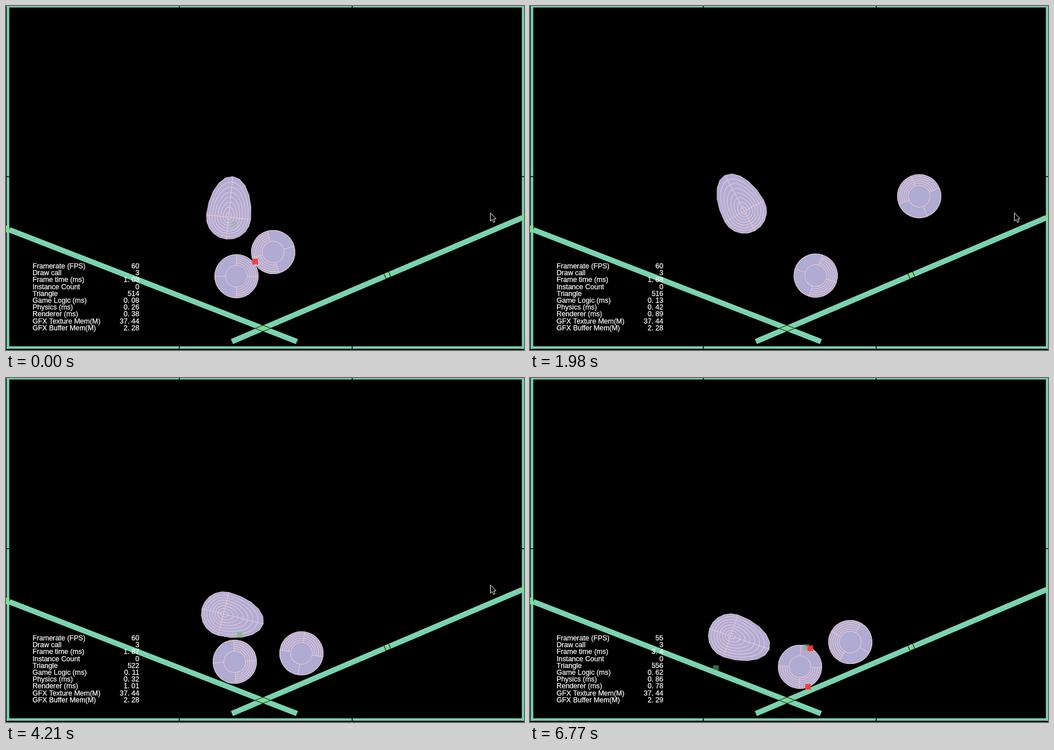
Animation of 917 by 611 pixels, one loop 6.87 s. Source, as an HTML page with a canvas:

```html
<!DOCTYPE html>
<html lang="en">
<head>
<meta charset="utf-8">
<title>Bouncing bodies</title>
<style>
  html, body { margin: 0; width: 100%; height: 100%; overflow: hidden; background: #000; }
  canvas { display: block; }
</style>
</head>
<body>
<canvas id="stage" width="917" height="611"></canvas>
<script>
const ctx = document.getElementById('stage').getContext('2d');
const LOOP = 6870, STEP = 149, GRAVITY = 320 / 1e6, FADE = 420;
const RAD = Math.PI / 180, TAU = 2 * Math.PI;
const MINT = '#76d0b2', EDGE = '#8adfb0', GREEN = '#7fdc8c', FILL = '#b1add6', LINE = '#ecccd0';

// Moments of the key poses
const TIMES = [50, 1390, 2570, 3620, 4210, 5690, 6770];

// The two ramps: start, end
const ramps = [[6, 397.5, 515, 596], [400, 596, 914, 376]];
const rampY = ([x1, y1, x2, y2], x) => y1 + (x - x1) * (y2 - y1) / (x2 - x1);
const rampAt = x => ramps[x < 455 ? 0 : 1];
const rampAngle = ([x1, y1, x2, y2]) => Math.atan2(y2 - y1, x2 - x1);

// Height of the centre of a body that rests on a ramp
const restY = x => rampY(rampAt(x), x) - 43.5 / Math.cos(rampAngle(rampAt(x)));

// poses: x, y, degrees at TIMES; hits: time and x of each bounce on a ramp
function body(draw, poses, hits) {
  const keys = poses.map(([x, y], i) => [TIMES[i], x, y])
    .concat(hits.map(([t, x]) => [t, x, restY(x)]))
    .sort((a, b) => a[0] - b[0]);
  const turns = poses.map((p, i) => [TIMES[i], p[2]]);
  return { draw, keys, turns, hits };
}

const bodies = [
  body(egg,
    [[394, 375, 6], [342, 387.5, -23], [417, 453, -34], [415, 401, 117], [385, 419, 104], [301, 418, 77], [355, 458, 109]],
    [[900, 336], [5280, 315], [6580, 342]]),
  body(disc,
    [[408, 480, 0], [512, 479, 4], [485, 498, 32], [467, 515, 37], [405, 504, -3], [424, 498, 11], [478, 513, 92]],
    [[250, 418], [1500, 519], [2300, 497], [2650, 487], [3610, 467], [5400, 401], [6760, 478]]),
  body(disc,
    [[473, 437, 165], [690, 395, 169], [688, 392, 327], [588, 384, 308], [523, 489, 279], [520, 455, 351], [567, 469, 210]],
    [[1190, 690], [2700, 687], [4240, 520], [5390, 552]])];

// Bumps between bodies, then bounces on the ramps: time, x, y
const contacts = [[50, 441, 454], [-230, 403, 388], [2570, 450, 477], [3450, 464, 461],
  [4060, 414, 456], [6600, 489, 478], [6740, 496, 480]];
for (const { hits } of bodies)
  for (const [t, x] of hits) {
    const a = rampAngle(rampAt(x));
    contacts.push([t, x - 36 * Math.sin(a), restY(x) + 36 * Math.cos(a)]);
  }

const labels = ['Framerate (FPS)', 'Draw call', 'Frame time (ms)', 'Instance Count', 'Triangle',
  'Game Logic (ms)', 'Physics (ms)', 'Renderer (ms)', 'GFX Texture Mem(M)', 'GFX Buffer Mem(M)'];
// Per key pose: fps, frame time, triangles, logic, physics, renderer
const readings = [
  [60, 1.03, 514, 0.08, 0.26, 0.38], [60, 1.88, 516, 0.13, 0.42, 0.89],
  [59, 2.56, 514, 0.09, 0.4, 1.58], [60, 1.55, 518, 0.2, 0.29, 0.68],
  [60, 1.87, 522, 0.11, 0.32, 1.01], [60, 1.92, 514, 0.09, 0.36, 0.73],
  [55, 3.4, 556, 0.62, 0.86, 0.78]];

const clamp = v => Math.max(0, Math.min(1, v));
const lerp = (a, b, u) => a + (b - a) * u;

// Index of the span that holds t
function spanAt(times, t) {
  let i = 0;
  while (i < times.length - 2 && times[i + 1] <= t) i++;
  return i;
}

// The picture is refreshed about every 149 ms, in even steps between key poses
function refreshTime(t) {
  const i = spanAt(TIMES, t), a = TIMES[i], span = TIMES[i + 1] - a;
  const n = Math.round(span / STEP);
  const k = Math.floor((t - a) / span * n + 0.04);
  return a + Math.max(0, Math.min(n, k)) * span / n;
}

// Free flight between keys, steady spin between poses
function place({ keys, turns }, t) {
  const k = spanAt(keys.map(r => r[0]), t), [t0, x0, y0] = keys[k], [t1, x1, y1] = keys[k + 1];
  const u = clamp((t - t0) / (t1 - t0));
  const j = spanAt(TIMES, t), [s0, d0] = turns[j], [s1, d1] = turns[j + 1];
  return [lerp(x0, x1, u),
    lerp(y0, y1, u) - GRAVITY / 2 * (t1 - t0) ** 2 * u * (1 - u),
    lerp(d0, d1, clamp((t - s0) / (s1 - s0))) * RAD];
}

function placed([x, y, angle], draw) {
  ctx.save();
  ctx.translate(x, y);
  ctx.rotate(angle);
  draw();
  ctx.restore();
}

function line(x1, y1, x2, y2, color, width = 1) {
  ctx.beginPath();
  ctx.moveTo(x1, y1);
  ctx.lineTo(x2, y2);
  ctx.strokeStyle = color;
  ctx.lineWidth = width;
  ctx.stroke();
}

function rect(x, y, w, h, color) {
  ctx.fillStyle = color;
  ctx.fillRect(x, y, w, h);
}

function polygon(points, fill, stroke, width = 1) {
  ctx.beginPath();
  for (const [x, y] of points) ctx.lineTo(x, y);
  ctx.closePath();
  ctx.fillStyle = fill;
  ctx.fill();
  ctx.strokeStyle = stroke;
  ctx.lineWidth = width;
  ctx.stroke();
}

function arc(r, from = 0, to = TAU) {
  ctx.beginPath();
  ctx.arc(0, 0, r, from, to);
  ctx.stroke();
}

function disc() {
  ctx.fillStyle = '#afabd3';
  ctx.strokeStyle = LINE;
  ctx.lineWidth = 1;
  arc(38.5);
  ctx.fill();
  ctx.stroke();
  arc(19.3);
  for (let r = 23.2; r < 38; r += 3.8) arc(r, -TAU / 4, TAU / 4);
  for (let a = 0; a < TAU - 0.1; a += TAU / 4) {
    const c = Math.cos(a), s = Math.sin(a);
    line(c * 19.3, s * 19.3, c * 38.5, s * 38.5, LINE);
  }
}

function egg() {
  const rim = Array.from({ length: 20 }, (_, k) => {
    const s = Math.sin(k * TAU / 20);
    return [39.3 * Math.cos(k * TAU / 20), s * (s < 0 ? 72.5 : 39.3)];
  });
  polygon(rim, FILL, LINE);
  for (let k = 1; k < 8; k++) {
    const r = 39 * k / 8;
    ctx.beginPath();
    ctx.ellipse(0, 0, r, 71 * k / 8, 0, Math.PI, TAU);
    ctx.ellipse(0, 0, r, r, 0, 0, Math.PI);
    ctx.stroke();
  }
  line(0, -71, 0, 38.5, LINE);
  line(-38.5, 0, 38.5, 0, LINE);
}

function plank(ramp) {
  const [x1, y1, x2, y2] = ramp, len = Math.hypot(x2 - x1, y2 - y1);
  placed([x1, y1, rampAngle(ramp)], () => {
    rect(0, -4.6, len, 9.2, MINT);
    for (const y of [-4.2, -1.3, 4.2]) line(0, y, len, y, EDGE, 0.8);
  });
}

function room() {
  rect(0, 0, 917, 611, '#000');
  rect(1, 0, 916, 2.6, MINT);
  rect(1, 604.4, 916, 4.4, MINT);
  rect(1.2, 0, 4.6, 609, MINT);
  rect(913.2, 0, 3.8, 609, MINT);
  for (const x of [306, 612]) {
    rect(x, 0, 1.5, 3, '#000');
    rect(x, 604, 1.5, 5, '#000');
  }
  rect(0, 302.5, 917, 1.5, '#000');

  ramps.forEach(plank);
  rect(0, 390, 6, 12, GREEN);
  rect(913, 370, 4, 10, GREEN);
  placed([675, 478, rampAngle(ramps[1])], () => {
    rect(-5, -5, 10, 10, '#000');
    rect(-4, -4.6, 8, 9.2, GREEN);
  });
  polygon([[441, 572.5], [455, 567], [469, 572.5], [455, 578]], GREEN, '#06150c');
}

function marks(t) {
  for (const [at, x, y] of contacts) {
    const age = t - at;
    if (age < 0 || age > FADE) continue;
    ctx.globalAlpha = age < 100 ? 0.95 : 1 - age / FADE;
    rect(x - 5, y - 5, 10, 10, age < 100 ? '#f83a36' : '#6cbf6e');
    ctx.globalAlpha = 1;
  }
}

function panel(t) {
  const i = spanAt(TIMES, t), late = t > (TIMES[i] + TIMES[i + 1]) / 2;
  const [fps, time, tris, logic, physics, renderer] = readings[late ? i + 1 : i];
  const values = [fps, 3, time, 0, tris, logic, physics, renderer, 37.44, t > 4950 ? 2.29 : 2.28];
  ctx.font = '12.5px Arial, "Liberation Sans", sans-serif';
  ctx.fillStyle = ctx.strokeStyle = '#fff';
  ctx.lineWidth = 0.25;
  const write = (text, x, y, align) => {
    ctx.textAlign = align;
    ctx.fillText(text, x, y);
    ctx.strokeText(text, x, y);
  };
  labels.forEach((label, row) => {
    const y = 466 + row * 12.2;
    write(label, 47, y, 'left');
    write(String(values[row]).replace('.', '. '), 236, y, 'right');
  });
}

function pointer(t) {
  const move = clamp((t - 5250) / 440), leave = clamp((t - 5800) / 300);
  const at = [857.5 + 48 * move + 20 * leave, 367.5 + 189 * move + 56 * leave, 0];
  placed(at, () => polygon(
    [[0, 0], [0, 14.5], [3.2, 11.8], [5.6, 17], [8, 16], [5.8, 10.8], [10, 10.4]], '#000', '#fff'));
}

function render(t) {
  room();
  for (const b of bodies) placed(place(b, t), b.draw);
  marks(t);
  panel(t);
  pointer(t);
}

const start = performance.now();
function loop() {
  render(refreshTime((performance.now() - start) % LOOP));
  requestAnimationFrame(loop);
}
loop();
</script>
</body>
</html>
```
